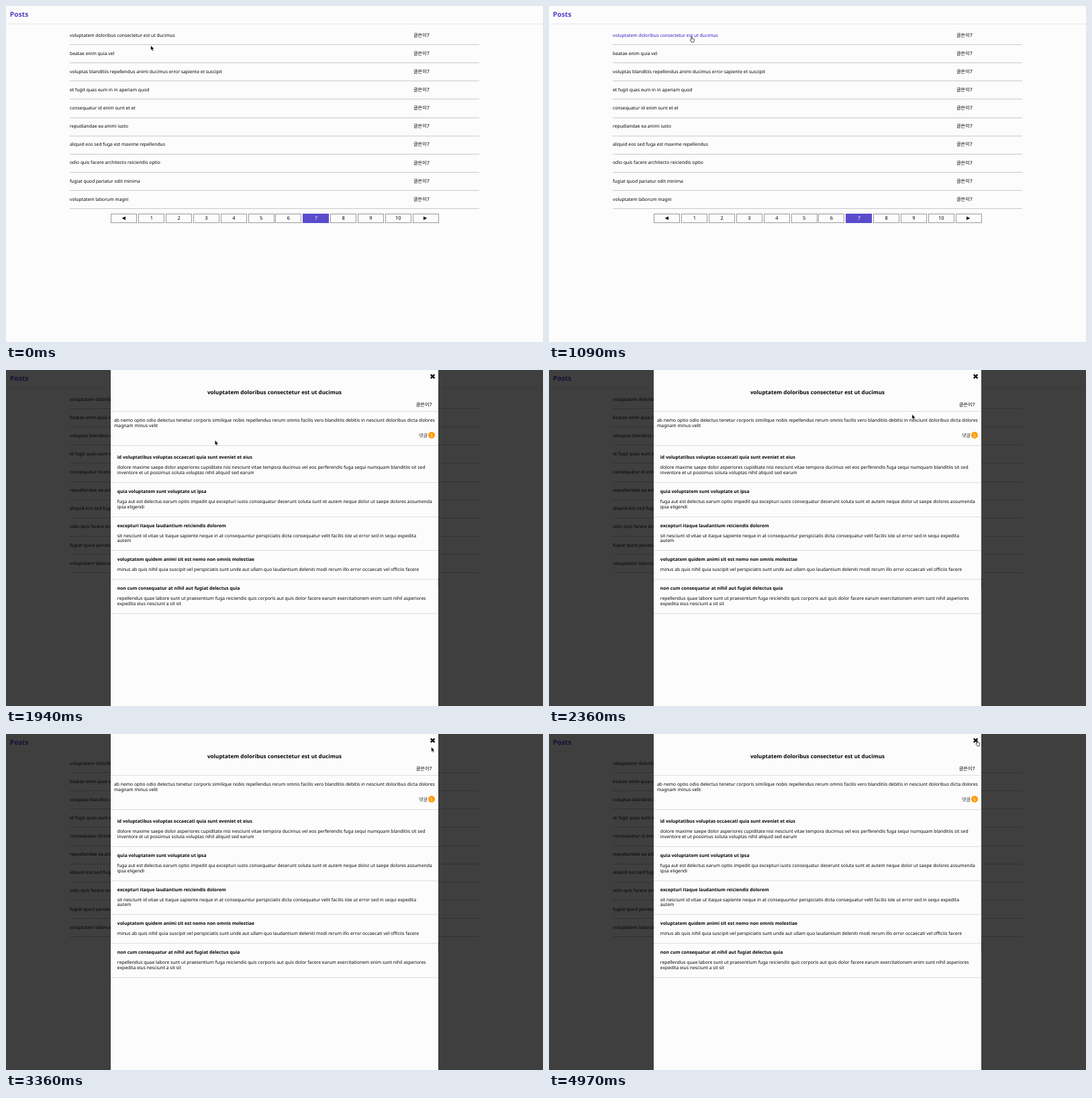
An HTML page that plays this animation: 800x500 px, repeating every 5 s.

```html
<!DOCTYPE html>
<html lang="ko">
<head>
<meta charset="utf-8">
<title>Posts</title>
<style>
html, body { margin: 0; width: 100%; height: 100%; overflow: hidden; background: #fcfcfc; }
svg { display: block; }
text { font-family: "Noto Sans", "Noto Sans CJK KR", "Noto Sans CJK", sans-serif; text-rendering: geometricPrecision; white-space: pre; }
</style>
</head>
<body>
<svg id="stage" width="800" height="500" viewBox="0 0 800 500">
  <defs>
    <linearGradient id="shade" x2="0" y2="1">
      <stop stop-color="#e9e9e9"/><stop offset="1" stop-color="#fcfcfc"/>
    </linearGradient>
  </defs>
  <rect width="800" height="500" fill="#fcfcfc"/>
  <g id="list"><rect y="26" width="800" height="2.5" fill="url(#shade)"/></g>
  <g id="modal">
    <rect width="800" height="500" fill="#000" opacity=".75"/>
    <rect x="156" width="488" height="500" fill="#fcfcfc"/>
    <path d="M632.8 6.8l5.6 5.6m0-5.6l-5.6 5.6" stroke="#000" stroke-width="2.2"/>
    <circle cx="634" cy="97" r="5" fill="#f90"/>
  </g>
  <path id="arrow" d="M0 0V7.3L1.6 5.8 2.7 8.4 4 7.8 2.9 5.2H5.1Z" stroke="#fff" stroke-width=".5"/>
  <path id="hand" d="M.4 5V.9a.6.6 0 0 1 1.2 0V3.2l2.6.6q.8.2.7 1l-.3 2-.6 1.7H1L-.9 5.8Q-1.3 5-.5 4.7Z" fill="#fff" stroke="#000" stroke-width=".7"/>
</svg>
<script>
const $ = id => document.getElementById(id);
const list = $('list'), modal = $('modal'), arrow = $('arrow'), hand = $('hand');

function add(parent, tag, attrs) {
  const el = document.createElementNS('http://www.w3.org/2000/svg', tag);
  for (const key in attrs) el.setAttribute(key, attrs[key]);
  return parent.appendChild(el);
}

// Large type scaled down keeps the fractional glyph spacing.
function write(parent, x, y, string, { size = 6.79, bold, fill = '#000', anchor = 'start' } = {}) {
  const el = add(parent, 'text', {
    transform: `translate(${x} ${y}) scale(.1)`, 'font-size': size * 10,
    'font-weight': bold ? 700 : 400, fill, 'text-anchor': anchor
  });
  el.textContent = string;
  return el;
}

const rule = (parent, x, y, width, fill) => add(parent, 'rect', { x, y: Math.round(y), width, height: 1, fill });

// Post list
write(list, 5.8, 15.6, 'Posts', { size: 10.3, bold: true, fill: '#523cc8' });
const links = [
  'voluptatem doloribus consectetur est ut ducimus',
  'beatae enim quia vel',
  'voluptas blanditiis repellendus animi ducimus error sapiente et suscipit',
  'et fugit quas eum in in aperiam quod',
  'consequatur id enim sunt et et',
  'repudiandae ea animi iusto',
  'aliquid eos sed fuga est maxime repellendus',
  'odio quis facere architecto reiciendis optio',
  'fugiat quod pariatur odit minima',
  'voluptatem laborum magni'
].map((title, i) => {
  const y = 27.13 * i;
  rule(list, 95, 57 + y, 610, '#c9c9c9');
  write(list, 607, 45.6 + y, '글쓴이7', { size: 7.2 });
  return write(list, 95, 45.5 + y, title);
});

// Pagination
for (let i = 0; i < 12; i++) {
  const x = 156.4 + 40.83 * i, mid = x + 19, active = i === 7;
  add(list, 'rect', {
    x: Math.round(x) + .5, y: 309.5, width: 38, height: 13,
    fill: active ? '#5a4bcc' : '#fcfcfc', stroke: active ? '#5a4bcc' : '#999'
  });
  if (i % 11) write(list, mid + .6, 318.2, i, { size: 7.4, anchor: 'middle', fill: active ? '#fff' : '#000' });
  else {
    const side = i ? 1 : -1;
    add(list, 'path', { d: `M${mid + side * 2.8} 315.8l${-side * 5.4}-2.6v5.2z` });
  }
}

// Post dialog
write(modal, 400, 36, 'voluptatem doloribus consectetur est ut ducimus', { size: 8.11, bold: true, anchor: 'middle' });
write(modal, 634.7, 53.6, '글쓴이7', { size: 7.2, anchor: 'end' });
rule(modal, 156, 61, 488, '#dedede');
write(modal, 161, 77, 'ab nemo optio odio delectus tenetur corporis similique nobis repellendus rerum omnis facilis vero blanditiis debitis in nesciunt doloribus dicta dolores');
write(modal, 161, 84.7, 'magnam minus velit');
write(modal, 628.2, 99.5, '댓글', { size: 7.2, anchor: 'end', fill: '#333' });
write(modal, 634, 99.5, '5', { fill: '#fff', anchor: 'middle' });
rule(modal, 156, 112, 488, '#dedede');

let baseline = 132.3;
for (const [head, ...lines] of [
  ['id voluptatibus voluptas occaecati quia sunt eveniet et eius',
    'dolore maxime saepe dolor asperiores cupiditate nisi nesciunt vitae tempora ducimus vel eos perferendis fuga sequi numquam blanditiis sit sed',
    'inventore et ut possimus soluta voluptas nihil aliquid sed earum'],
  ['quia voluptatem sunt voluptate ut ipsa',
    'fuga aut est delectus earum optio impedit qui excepturi iusto consequatur deserunt soluta sunt et autem neque dolor ut saepe dolores assumenda',
    'ipsa eligendi'],
  ['excepturi itaque laudantium reiciendis dolorem',
    'sit nesciunt id vitae ut itaque sapiente neque in at consequuntur perspiciatis dicta consequatur velit facilis iste ut error sed in sequi expedita',
    'autem'],
  ['voluptatem quidem animi sit est nemo non omnis molestiae',
    'minus ab quis nihil quia suscipit vel perspiciatis sunt unde aut ullam quo laudantium deleniti modi rerum illo error occaecati vel officiis facere'],
  ['non cum consequatur at nihil aut fugiat delectus quia',
    'repellendus quae labore sunt ut praesentium fuga reiciendis quis corporis aut quis dolor facere earum exercitationem enim sunt nihil asperiores',
    'expedita eius nesciunt a sit sit']
]) {
  write(modal, 165.8, baseline, head, { bold: true });
  lines.forEach((line, i) => write(modal, 165.8, baseline + 15 + 7.8 * i, line));
  baseline += 35 + 7.8 * lines.length;
  rule(modal, 156, baseline - 15.9, 488, '#dedede');
}

// Pointer path: time, x, y
const path = [
  [0, 215.7, 58.7], [520, 211.5, 45.3], [1590, 211.5, 45.3], [1790, 311, 104.5],
  [1930, 311, 104.5], [2560, 612, 54], [2790, 613.3, 50.3], [3030, 613.3, 46.5],
  [3500, 639, 12], [3600, 639, 12], [3850, 637, 9.4], [5000, 637, 9.4]
];
const clamp = v => Math.min(1, Math.max(0, v));
const smooth = v => v * v * (3 - 2 * v);

function pointerAt(t) {
  const i = path.findIndex(p => p[0] > t);
  const [t0, x0, y0] = path[i - 1], [t1, x1, y1] = path[i];
  const k = smooth((t - t0) / (t1 - t0));
  return [x0 + (x1 - x0) * k, y0 + (y1 - y0) * k];
}

function draw(now) {
  const t = now % 5000, opened = t >= 1120;
  const [x, y] = pointerAt(t);
  const pointing = opened ? x > 631 && y < 17 : y < 49;
  const hover = smooth(opened ? clamp((1350 - t) / 230) : clamp((t - 330) / 200));

  modal.style.display = opened ? '' : 'none';
  links[0].setAttribute('fill', `rgb(${52 * hover},${24 * hover},${196 * hover})`);
  arrow.style.display = pointing ? 'none' : '';
  hand.style.display = pointing ? '' : 'none';
  for (const el of [arrow, hand]) el.setAttribute('transform', `translate(${x} ${y})`);
}

const start = performance.now();
function tick() {
  draw(performance.now() - start);
  requestAnimationFrame(tick);
}
tick();
</script>
</body>
</html>
```
